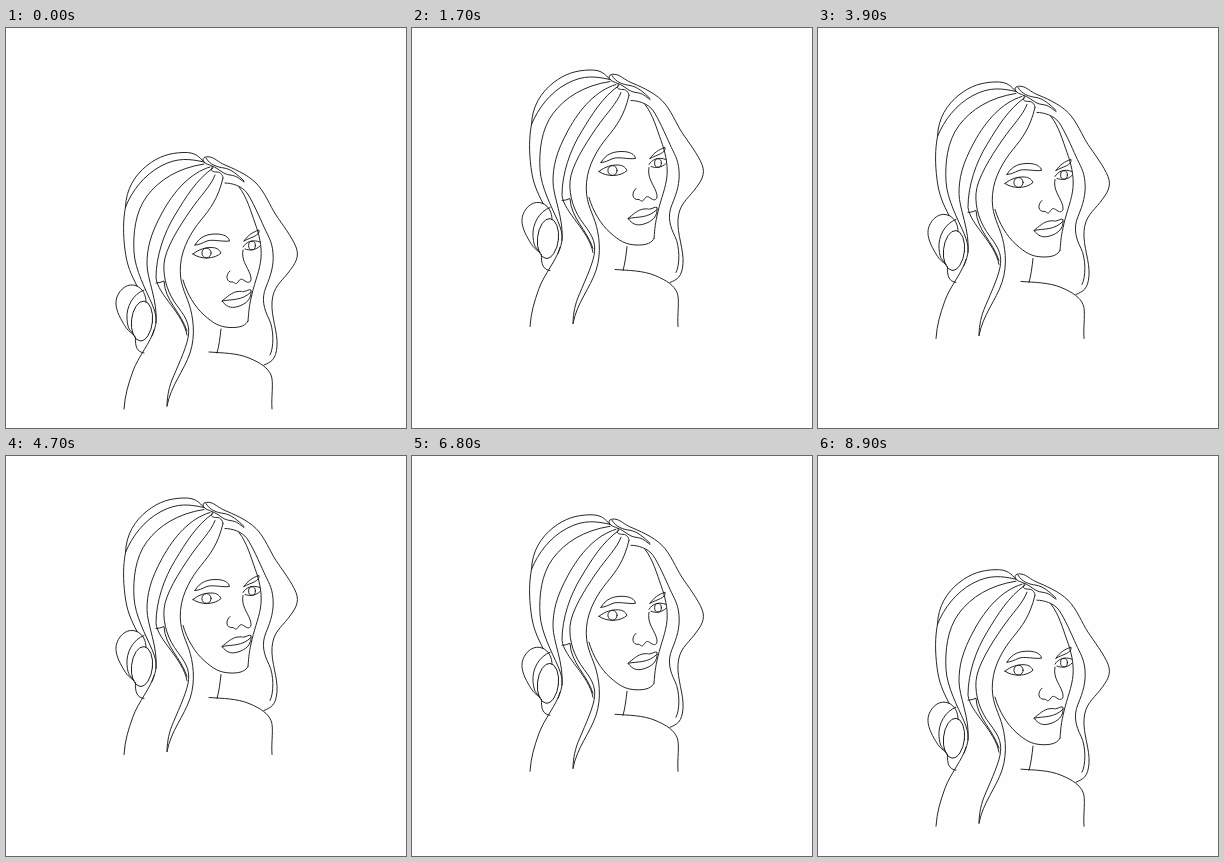
Animation of 400 by 400 pixels, one loop 9 s. Source, as an HTML page without scripts:

```html
<!DOCTYPE html>
<html lang="en">
<head>
<meta charset="utf-8">
<title>Bouncing line portrait</title>
<style>
  @property --n { syntax: "<number>"; inherits: false; initial-value: 0; }
  html, body { margin: 0; width: 100%; height: 100%; overflow: hidden; background: #fefefe; }
  svg { display: block; width: 100vw; height: 100vh; }
  /* 30 steps along a parabola, 84px high */
  .portrait {
    fill: none; stroke: #1c1c1c; stroke-width: .95; stroke-linecap: round; stroke-linejoin: round;
    transform: translateY(calc(var(--n) * (var(--n) - 30) * .3733px));
    animation: bounce 3s steps(30) -10ms infinite;
  }
  @keyframes bounce { from { --n: 0; } to { --n: 30; } }
</style>
</head>
<body>
<svg viewBox="0 0 400 400">
  <g class="portrait">
    <g class="crown">
      <path d="M119.500 179C120 161 129 147 141 137.500S164 125 177 124.500S193 129 198 134"/>
      <path d="M119.500 179C126 163 138 147 155 138S184 131 198 134"/>
      <path d="M119.500 179C117 192 117 206 119 222S125 246 131 258"/>
      <path d="M198 136C172 140 153 152 141 168S127 206 128 224S140 262 146 276S151 296 146 308"/>
      <path d="M204 139C184 145 168 163 156 185S141 221 141 236S152 273 150 295"/>
      <path d="M207 140C190 152 180 169 169 187S150 228 150 250C152 267 177 285 181 307"/>
      <path d="M150 255Q154 255 158 253C159 273 175 284 181 303"/>
      <path d="M209 147C205 158 195 167 184 183S159 221 158 236S162 266 172 279S184 299 182 310S170 342 166 352S161 372 161 378"/>
      <path d="M217 150C212 171 204 181 195 192S176 219 174.500 237S179 264 183 276S190 307 184 325S165 357 161 378"/>
    </g>
    <g class="parting">
      <path d="M198 134C195 130 199 128 204 129S212 134 219 137S241 146 250 155S264 178 270 187S286 209 290 219S289 236 282 245S267 259 266 274S272 304 271 318S265 334 258 337"/>
      <path d="M198 134C200 137 208 137 206 140S207 144 211 144S217 148 217 150"/>
      <path d="M219 155C226 155 236 158 241 165S254 190 258 199S266 213 267 225S265 247 260 259S258 281 263 291S268 320 264 327"/>
      <path d="M200 130C204 137 211 139 218 140S232 147 238 153"/>
      <path d="M206 138C214 141 216 146 224 147S233 151 238 154"/>
      <path d="M233 159C241 169 245 184 249 195S256 218 255 230S249 253 246 266S243 281 242 293"/>
    </g>
    <g class="bun">
      <path d="M131 258C122 254 114 261 111 269S112 286 116 293S121 302 128 307"/>
      <path d="M138 262C127 266 120 279 121 291S124 301 128 307"/>
      <ellipse cx="136" cy="293" rx="10.500" ry="20" transform="rotate(6 136 293)"/>
      <path d="M131 258C137 261 140 267 140 274"/>
      <path d="M129.500 309C129 319 131 324 138 325"/>
    </g>
    <g class="body">
      <path d="M148 302C145 314 132 329 127 343S119 367 118 381"/>
      <path d="M203 324C217 325 231 325 243 330S262 340 265 347S265 369 266 381"/>
      <path d="M215 301C214 310 213 318 211 325"/>
      <path d="M177 252C181 266 189 279 198 287S213 299 224 299.500S240 297 242 293"/>
    </g>
    <g class="face">
      <path d="M189 217C194 208 202 206 210 206S223 209 223.500 213C217 214 206 211 201 213S193 217 189 217Z"/>
      <path d="M187 226C193 221 200 219.500 205 219.500S213 221 215 225C209 231 195 232 187 226Z"/>
      <ellipse cx="200.500" cy="225" rx="4.600" ry="4.900"/>
      <path d="M238 213C242 207 247 204 253 202C254 208 245 209 238 213Z"/>
      <path d="M237 219C240 214 246 211 254 214M239 221C244 223 250 222 254 218"/>
      <ellipse cx="246" cy="217.500" rx="3.400" ry="4.300"/>
      <path d="M237 222C235 232 241 238 244 246S243 256 239 253S234 251 232 254S229 255 227 254C220 255 219 247 224 243"/>
      <path d="M216 273C221 269 226 264 232 263.500S235 264 238 263.500S243 261 245 262C246 271 240 276 232 278.500S220 278 216 273C226 271 236 273 245 264"/>
    </g>
  </g>
</svg>
</body>
</html>
```
